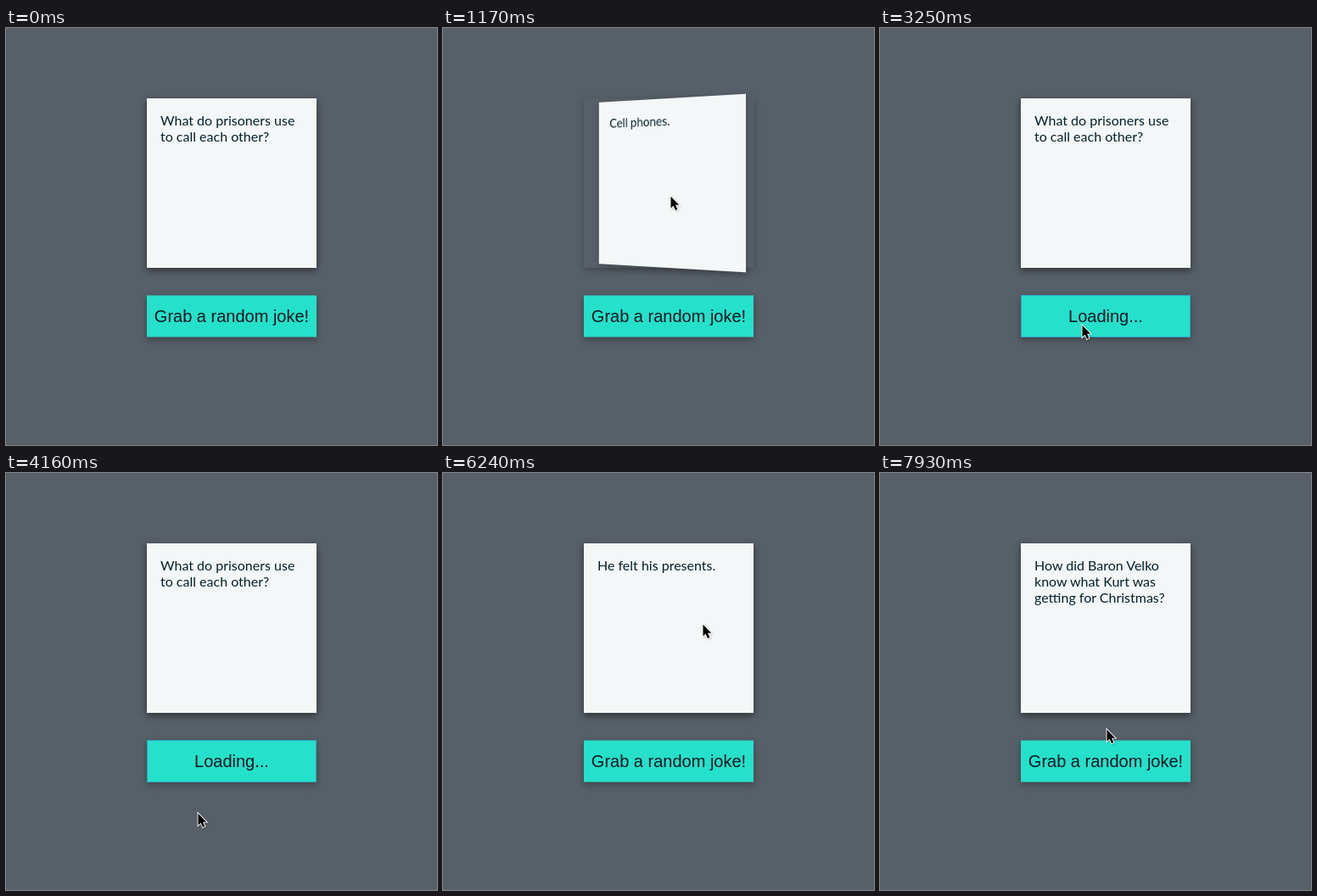
Recreate the animation shown at these times as an HTML page. Size 508 by 492 pixels, loop 8000 ms.

```html
<!DOCTYPE html>
<html lang="en">
<head>
<meta charset="utf-8">
<title>Joke card</title>
<style>
  html, body { margin: 0; width: 100%; height: 100%; overflow: hidden; background: #575f68; }
  #card, #face, #button, #cursor { position: absolute; box-sizing: border-box; }
  #card, #face { box-shadow: 0 3px 8px rgba(0, 0, 0, .25); }
  #card { left: 166px; top: 83px; width: 200px; height: 200px; perspective: 1000px; }
  #face {
    inset: 0; padding: 16px; background: #f4f7f7; color: #04202b;
    font: 16px/19px Lato, "Open Sans", sans-serif; white-space: pre;
  }
  #button {
    --edge: rgba(87, 95, 104, .5);
    left: 166px; top: 315px; width: 200px; height: 50px; background: #25e0ca; color: #0b1620;
    box-shadow: 0 3px 8px rgba(0, 0, 0, .3), inset 0 1px var(--edge), inset 0 -1px var(--edge);
    font: 20px/50px "Liberation Sans", Arial, sans-serif; text-align: center; white-space: nowrap;
  }
  #button.focus { outline: 1px solid #2fa8c4; outline-offset: -1px; }
  #cursor { left: 0; top: 0; overflow: visible; filter: drop-shadow(1px 1px 1px rgba(0, 0, 0, .2)); }
</style>
</head>
<body>
<div id="card"><div id="face"></div></div>
<div id="button"></div>
<svg id="cursor" width="14" height="20">
  <path d="M.5 .8V14.6L3.6 11.7L6 17L8.4 15.9L6 10.7H10.2Z" fill="#000" stroke="#fff" stroke-width="1.8" paint-order="stroke"/>
</svg>
<script>
const LOOP = 8000, FLIP = 600;
const flips = [852, 1701, 5692, 7055]; // alternately to the back and to the front
const clicked = 3100, loaded = 4640, blurred = 5680;
const jokes = [
  ["What do prisoners use\nto call each other?", "Cell phones."],
  ["How did Baron Velko\nknow what Kurt was\ngetting for Christmas?", "He felt his presents."]
];
// time, x, y of the pointer tip
const path = [
  [250, 84, 438], [650, 268, 198], [2180, 268, 198], [2600, 232, 435], [2680, 232, 435],
  [3020, 238, 350], [3420, 238, 350], [3900, 226, 401], [5000, 226, 401],
  [5310, 306, 178], [7480, 306, 178], [7930, 267, 302], [8000, 267, 302]
];
const [face, button, cursor] = ["face", "button", "cursor"].map(id => document.getElementById(id));
const clamp = v => Math.min(1, Math.max(0, v));
const bezier = (u, a, b) => 3 * u * (1 - u) ** 2 * a + 3 * u * u * (1 - u) * b + u ** 3;

// CSS "ease"
function ease(p) {
  let lo = 0, hi = 1;
  for (let i = 0; i < 24; i++) {
    const mid = (lo + hi) / 2;
    if (bezier(mid, .25, .25) < p) lo = mid; else hi = mid;
  }
  return p <= 0 ? 0 : p >= 1 ? 1 : bezier(lo, .1, 1);
}

function pointer(t) {
  const i = path.findIndex(k => k[0] > t);
  if (i < 1) return null;
  const [t0, x0, y0] = path[i - 1], [t1, x1, y1] = path[i];
  const p = (t - t0) / (t1 - t0), s = p * p * (3 - 2 * p);
  return [x0 + (x1 - x0) * s, y0 + (y1 - y0) * s];
}

function setText(el, text) {
  if (el.textContent !== text) el.textContent = text;
}

function draw(t) {
  const turn = flips.reduce((sum, start, i) => sum + (i % 2 ? -1 : 1) * ease(clamp((t - start) / FLIP)), 0);
  const back = turn > .5;
  const angle = 180 * (back ? turn - 1 : turn);
  face.style.transform = Math.abs(angle) < 1.5 ? "none" : `rotateY(${angle}deg)`;
  setText(face, jokes[t < loaded ? 0 : 1][back ? 1 : 0]);

  setText(button, t >= clicked && t < loaded ? "Loading..." : "Grab a random joke!");
  button.className = t >= clicked && t < blurred ? "focus" : "";

  const tip = pointer(t);
  cursor.style.display = tip ? "" : "none";
  if (tip) cursor.style.transform = `translate(${Math.round(tip[0])}px, ${Math.round(tip[1])}px)`;
}

const begin = performance.now();
function tick() {
  draw((performance.now() - begin) % LOOP);
  requestAnimationFrame(tick);
}
tick();
</script>
</body>
</html>
```
